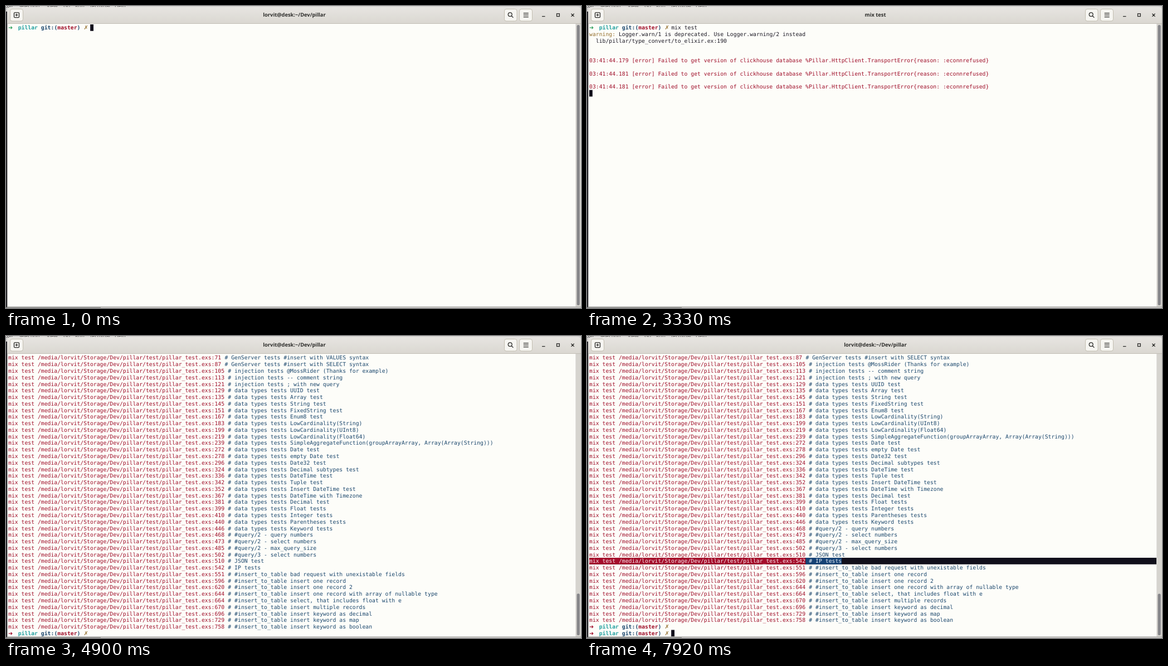
These frames come from a looping animation (1032 px wide and 542 px high, 8000 ms). An HTML page:

```html
<!DOCTYPE html>
<html lang="en">
<head>
<meta charset="utf-8">
<title>Terminal test run</title>
<style>
html, body { margin: 0; width: 100%; height: 100%; overflow: hidden; background: #fdfdf9; }
svg { display: block; width: 100%; height: 100%; }
text { white-space: pre; text-rendering: geometricPrecision; }
#screen text { font: 9.777px "DejaVu Sans Mono", monospace; }
#screen .b { font-weight: bold; }
#screen .sym { font: bold 9.8px "DejaVu Sans", sans-serif; }
#title { font: bold 9.3px "Noto Sans", sans-serif; fill: #2d2d2b; text-anchor: middle; }
.menu { font: 9px "Noto Sans", sans-serif; fill: #2b2b2b; }
.btn { fill: #f6f5f1; stroke: #c3beb1; }
.icon { fill: none; stroke: #2a2a28; stroke-width: 1.3; }
</style>
</head>
<body>
<svg viewBox="0 0 1032 542">
  <defs>
    <linearGradient id="bar" x2="0" y2="1">
      <stop offset="0" stop-color="#e7e5e1"/><stop offset="1" stop-color="#dad7d1"/>
    </linearGradient>
  </defs>
  <rect width="1032" height="542" fill="#d3d1d0"/>
  <g class="menu">
    <text x="-3" y="2.5">Edit</text><text x="22" y="2.5">Selection</text><text x="73" y="2.5">View</text>
    <text x="103" y="2.5">Go</text><text x="124" y="2.5">Run</text><text x="150" y="2.5">Terminal</text>
    <text x="195" y="2.5">Help</text>
  </g>
  <rect y="10" width="2" height="532" fill="#222227"/>
  <rect x="2" y="10" width="2" height="532" fill="#bdbbb7"/>
  <path d="M2 32V8Q2 1.5 9 1.5H1025Q1032 1.5 1032 8V32Z" fill="url(#bar)"/>
  <rect x="3" y="32" width="1019.5" height="507.5" fill="#fdfdf9"/>
  <rect x="2" y="31" width="1030" height="1" fill="#c2beb6"/>
  <rect x="1022.5" y="32" width="9.5" height="507.5" fill="#d6d4cf"/>
  <rect x="2" y="539.5" width="1030" height="1.2" fill="#a5a5a1"/>
  <rect y="540.5" width="170" height="1.5" fill="#8f8f8d"/>
  <rect class="btn" x="7.5" y="5.5" width="23" height="21.5" rx="3.5"/>
  <rect class="btn" x="894.5" y="5.5" width="22.5" height="21.5" rx="3.5"/>
  <rect class="btn" x="921.5" y="5.5" width="23" height="21.5" rx="3.5"/>
  <g class="icon">
    <rect x="14.5" y="11.8" width="9" height="8.8" rx="1.3"/>
    <path d="M19 13.8V18.6M16.6 16.2H21.4"/>
    <circle cx="904.7" cy="15.2" r="3.4"/><path d="M907.2 17.7L910.4 20.9"/>
    <path d="M928.7 12.8H937.7M928.7 16.2H937.7M928.7 19.6H937.7"/>
    <path d="M962 18.6H967.5M1014.4 13.7L1019.6 18.9M1019.6 13.7L1014.4 18.9"/>
    <rect x="988.5" y="13.8" width="4.8" height="4.8"/>
  </g>
  <text id="title" x="517.5" y="19.4"></text>
  <rect id="thumb" x="1024.5" width="5.2" rx="2.6" fill="#858589"/>
  <g id="screen"></g>
</svg>
<script>
const LOOP = 8000, ROWS = 43, CW = 5.886, LH = 11.774, X0 = 4, Y0 = 33;
const INK = "#1d1a26", RED = "#a00f2a", BLUE = "#1b476d", TEAL = "#22a09f",
      OCHRE = "#95702f", GREEN = "#2d9f5b", DARK = "#110f1b";
const HOME = "lorvit@desk:~/Dev/pillar";

const tests = `71 GenServer tests #insert with VALUES syntax
87 GenServer tests #insert with SELECT syntax
105 injection tests @MossRider (Thanks for example)
113 injection tests -- comment string
121 injection tests ; with new query
129 data types tests UUID test
135 data types tests Array test
145 data types tests String test
151 data types tests FixedString test
167 data types tests Enum8 test
183 data types tests LowCardinality(String)
199 data types tests LowCardinality(UInt8)
219 data types tests LowCardinality(Float64)
239 data types tests SimpleAggregateFunction(groupArrayArray, Array(Array(String)))
272 data types tests Date test
278 data types tests empty Date test
296 data types tests Date32 test
324 data types tests Decimal subtypes test
336 data types tests DateTime test
342 data types tests Tuple test
352 data types tests Insert DateTime test
367 data types tests DateTime with Timezone
381 data types tests Decimal test
399 data types tests Float tests
410 data types tests Integer tests
440 data types tests Parentheses tests
446 data types tests Keyword tests
468 #query/2 - query numbers
473 #query/2 - select numbers
485 #query/2 - max_query_size
502 #query/3 - select numbers
510 JSON test
542 IP tests
551 #insert_to_table bad request with unexistable fields
596 #insert_to_table insert one record
620 #insert_to_table insert one record 2
644 #insert_to_table insert one record with array of nullable type
664 #insert_to_table select, that includes float with e
670 #insert_to_table insert multiple records
696 #insert_to_table insert keyword as decimal
729 #insert_to_table insert keyword as map
758 #insert_to_table insert keyword as boolean`.split("\n").map(s => {
  const i = s.indexOf(" ");
  return [s.slice(0, i), s.slice(i + 1)];
});

// A line is a list of spans: [column, text, colour, class]
const prompt = arrow => [
  [0, "➜", arrow, "sym"], [3, "pillar", TEAL, "b"], [10, "git:(", BLUE, "b"],
  [15, "master", RED, "b"], [21, ")", BLUE, "b"], [23, "✗", OCHRE, "sym"]
];
const testLine = ([no, name], cmdInk = RED, noteInk = BLUE) => {
  const cmd = "mix test /media/lorvit/Storage/Dev/pillar/test/pillar_test.exs:" + no;
  return [[0, cmd, cmdInk], [cmd.length + 1, "# " + name, noteInk]];
};

const millis = [179, 181, 181, 182, 183, 183, 184, 185];
for (let i = 0; i < 6; i++) millis.push(874 + i);
millis.push(880, 881, 883, 883, 884, 885, 885, 885, 886, 886, 887,
            887, 887, 888, 889, 889, 890, 891, 894, 894, 895);

const lines = [
  [...prompt(GREEN), [25, "mix test", INK]],
  [[0, "warning:", OCHRE], [9, "Logger.warn/1 is deprecated. Use Logger.warning/2 instead", INK]],
  [[2, "lib/pillar/type_convert/to_elixir.ex:190", INK]],
  []
];
for (const ms of millis) lines.push([], [[0, `03:41:44.${ms} [error] Failed to get version of clickhouse database ` +
  "%Pillar.HttpClient.TransportError{reason: :econnrefused}", RED]]);
tests.forEach(([no, name], i) => lines.push([],
  [[2, `${i + 1}) test ${name} (PillarTest)`, INK]],
  [[5, "test/pillar_test.exs:" + no, BLUE]],
  [[5, "** (MatchError) no match of right hand side value: {:error, :econnrefused}", RED]]));
lines.push([], [[0, "Finished in 0.9 seconds", INK]], [[0, tests.length + " failures", RED]], []);
const listStart = lines.length;
lines.push(...tests.map(t => testLine(t)));
const listEnd = lines.length;
lines.push(prompt(RED), prompt(RED));

// [time, number of lines printed]
const output = [[0, 1], [3080, 4], [3290, 6], [3330, 10], [3600, 12], [3640, 14], [3680, 18], [3720, 20],
  [3990, 54], [4020, 74], [4530, 102], [4570, 134], [4600, 166], [4640, 198], [4680, 232], [4720, listEnd],
  [4760, listEnd + 1], [5530, listEnd + 2]];
const keys = [920, 960, 1040, 1200, 1340, 1440, 1590, 1710];
const blinks = [2490, 3080, 3710, 4300, 4900, 5500, 6120, 6720, 7320, 7920];
const ENTER = 1910, PICK = 7610;
const passed = (times, t) => times.filter(x => x <= t).length;

const $ = id => document.getElementById(id);
const esc = s => s.replace(/&/g, "&amp;").replace(/</g, "&lt;");
const colX = c => (X0 + c * CW).toFixed(2);
const rowY = r => Y0 + r * LH;
const box = (x, r, w, fill) =>
  `<rect x="${x}" y="${rowY(r).toFixed(2)}" width="${w}" height="${LH}" fill="${fill}"/>`;
const drawLine = (spans, r) => spans.map(([c, s, fill, cls = ""]) =>
  `<text x="${colX(c)}" y="${(rowY(r) + 9.4).toFixed(2)}" fill="${fill}" class="${cls}">${esc(s)}</text>`).join("");

function drawPicked(test, r) {
  const spans = testLine(test, "#f8e9ec", "#e6eef6");
  const split = spans[0][1].length, end = spans[1][0] + spans[1][1].length;
  return box(X0, r, 1018, DARK) + box(X0, r, split * CW, "#a50d2b") +
    box(colX(split), r, (end - split) * CW, "#164275") + drawLine(spans, r);
}

let shown = "";
function render(t) {
  const n = output[passed(output.map(o => o[0]), t) - 1][1];
  const typed = passed(keys, t), lit = passed(blinks, t) % 2 === 0;
  const entered = t >= ENTER, picked = t >= PICK;
  const state = [n, typed, lit, entered, picked].join();
  if (state === shown) return;
  shown = state;

  const atPrompt = !entered || n > listEnd;
  const curRow = atPrompt ? n - 1 : n;
  const curCol = !atPrompt ? 0 : 25 + (entered ? 0 : typed);
  const top = Math.max(0, curRow + 1 - ROWS);
  const pickRow = listStart + tests.findIndex(x => x[1] === "IP tests");

  let out = "";
  for (let i = top; i < n; i++) {
    if (picked && i === pickRow) out += drawPicked(tests[i - listStart], i - top);
    else if (i === 0) out += drawLine([...prompt(GREEN), [25, "mix test".slice(0, typed), INK]], 0);
    else out += drawLine(lines[i], i - top);
  }
  if (lit) out += box(colX(curCol), curRow - top, CW, DARK);
  $("screen").innerHTML = out;
  $("title").textContent = atPrompt ? HOME : "mix test";

  const h = 503 * Math.min(1, ROWS / (curRow + 1));
  $("thumb").setAttribute("y", 537 - h);
  $("thumb").setAttribute("height", h);
}

const start = performance.now();
function tick() {
  render((performance.now() - start) % LOOP);
  requestAnimationFrame(tick);
}
render(0);
requestAnimationFrame(tick);
</script>
</body>
</html>
```
